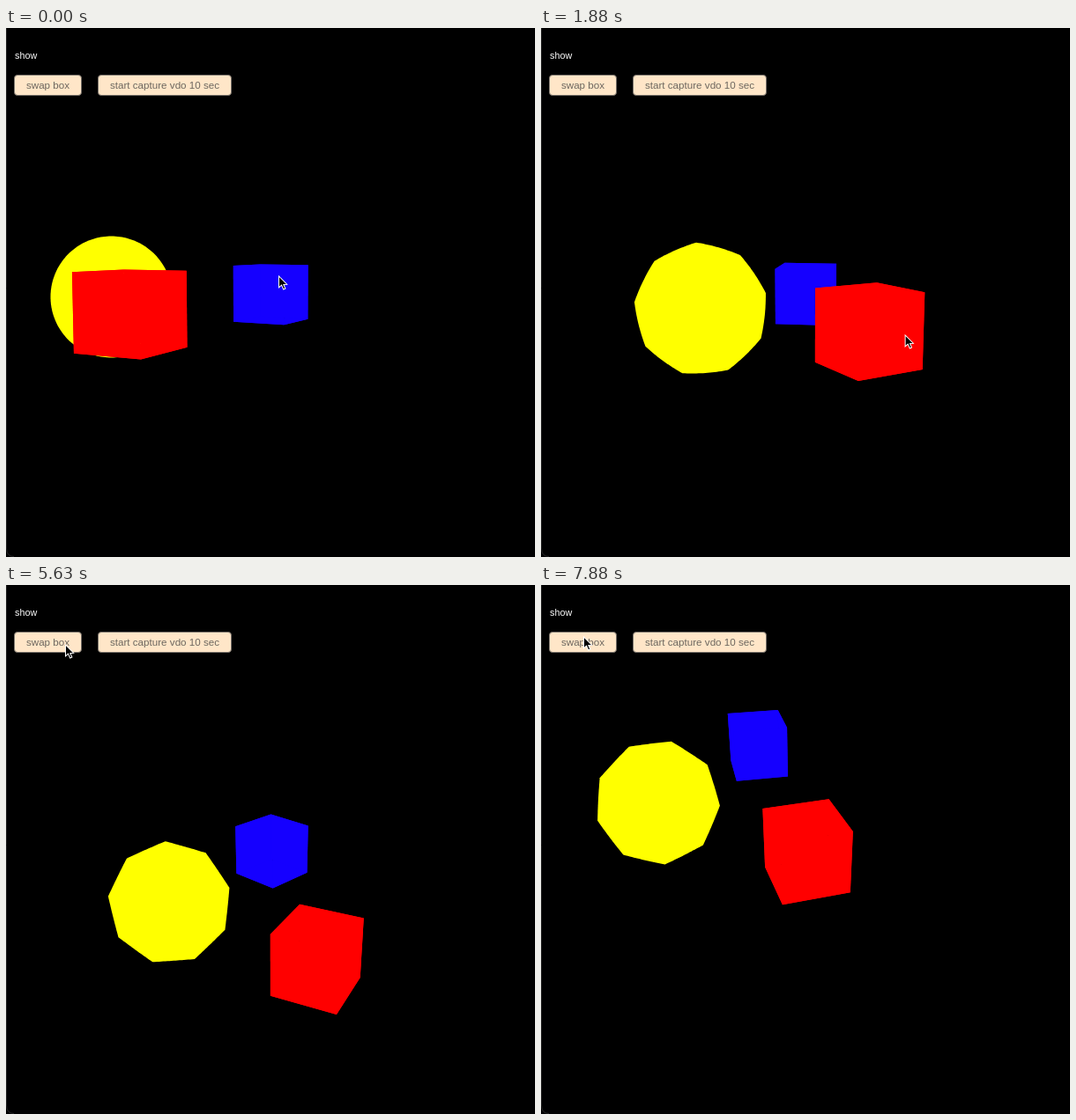
These frames come from a looping animation (600 by 601 pixels, 8 s). An HTML page with a canvas:

```html
<!DOCTYPE html>
<html>
<head>
<meta charset="utf-8">
<style>
html, body { margin: 0; width: 100%; height: 100%; overflow: hidden; background: #000; }
body { position: relative; font-family: "Liberation Sans", Arial, sans-serif; }
canvas, div { position: absolute; }
canvas { left: 0; top: 0; }
.label { left: 10px; top: 25px; font-size: 10.8px; line-height: 13px; color: #fff; }
.button {
  box-sizing: border-box; top: 53px; height: 24px; border: 1px solid #767069; border-radius: 4px;
  background: #ffe6c8; color: #6c675f; font-size: 11.65px; line-height: 22px;
  text-align: center; white-space: nowrap;
}
</style>
</head>
<body>
<div class="label">show</div>
<div class="button" style="left:9px;width:77px">swap box</div>
<div class="button" style="left:104px;width:152px">start capture vdo 10 sec</div>
<canvas width="600" height="601"></canvas>
<script>
const ctx = document.querySelector('canvas').getContext('2d');
const LOOP = 8000, STEP = 125;
const FOCAL = 725, MID_X = 301.5, MID_Y = 301;
const RAD = Math.PI / 180;

// The view is dragged through three poses, then "swap box" toggles the last one
const STOPS = [0, 1.125, 2.25];

// Cube pose: centre x, centre y, size, camera pitch, camera yaw
const blue = {
  color: '#1500ff', spin: t => 24 + (t - 4.5) / RAD,
  poses: [[301, 301, 62.8, 4, -54], [301.5, 301, 68.5, -17, -2], [301.5, 301, 57.5, 22, 0]],
  swapped: [245.7, 181.5, 58, 31.5, 0]
};
const red = {
  color: '#f00', spin: t => -23.2 - (t - 5.625) / RAD,
  poses: [[142.5, 321.5, 90, 4, -37], [407.5, 178.5, 104, -17, -8], [353, 422.5, 79.5, 22, 0]],
  swapped: [301, 301.5, 79.5, 31.5, 0]
};

// Ball pose: centre x, centre y, radius, angle of a corner, roundness
const ball = {
  poses: [[119.5, 305.5, 69, -94, 1], [173, 236, 87.5, -94, 0.9], [185.5, 361, 70, -94, 0.06]],
  swapped: [132, 247, 71, -77, 0.1]
};

const pointer = {
  stops: [0, 1.125, 3, 4.5, 5.5, 7.25, 7.75],
  poses: [[309, 282], [423, 319], [397, 394], [278, 360], [67, 68], [67, 68], [48, 59]]
};

const lerp = (a, b, k) => a + (b - a) * k;
const isSwapped = t => (t >= 6.6 && t < 7.2) || t >= 7.6;

function sample(stops, poses, t) {
  const i = stops.findIndex(stop => stop > t);
  if (i < 0) return poses.at(-1);
  const k = (t - stops[i - 1]) / (stops[i] - stops[i - 1]);
  return poses[i].map((v, n) => lerp(poses[i - 1][n], v, k));
}

const poseOf = (thing, t) => isSwapped(t) ? thing.swapped : sample(STOPS, thing.poses, t);

function fill(points, color) {
  ctx.beginPath();
  points.forEach(p => ctx.lineTo(p[0], p[1]));
  ctx.closePath();
  ctx.fillStyle = color;
  ctx.fill();
}

function drawCube(cube, t) {
  const [cx, cy, size, pitch, turn] = poseOf(cube, t);
  const yaw = (cube.spin(t) + turn) * RAD + Math.atan((cx - MID_X) / FOCAL);
  const c = Math.cos(pitch * RAD), s = Math.sin(pitch * RAD);
  const corner = (i, y) => {
    const a = yaw + i * Math.PI / 2;
    const x = Math.SQRT1_2 * Math.sin(a), away = Math.SQRT1_2 * Math.cos(a);
    const depth = 1 + (away * c - y * s) * size / FOCAL;
    return [MID_X + (cx - MID_X + x * size) / depth,
            MID_Y + (cy - MID_Y - (y * c + away * s) * size) / depth];
  };
  const top = [0, 1, 2, 3].map(i => corner(i, 0.5));
  const base = [0, 1, 2, 3].map(i => corner(i, -0.5));
  fill(top, cube.color);
  fill(base, cube.color);
  for (let i = 0; i < 4; i++) {
    const j = (i + 1) % 4;
    fill([top[i], top[j], base[j], base[i]], cube.color);
  }
}

// A nine-sided outline that can swell into a circle
function drawBall(t) {
  const [cx, cy, radius, corner, roundness] = poseOf(ball, t);
  const points = Array.from({ length: 180 }, (_, i) => {
    const offset = i * 2 % 40 - 20, a = (corner + 20 + i * 2 - 20 + 20 - 20) * RAD;
    const flat = Math.cos(20 * RAD) / Math.cos(offset * RAD);
    const r = radius * lerp(flat, 1, roundness);
    return [cx + r * Math.cos(a), cy + r * Math.sin(a)];
  });
  fill(points, '#ff0');
}

function drawPointer(t) {
  const [x, y] = sample(pointer.stops, pointer.poses, t);
  ctx.save();
  ctx.translate(x + 0.5, y);
  ctx.scale(0.92, 0.92);
  fill([[0, 0], [0, 14], [3.3, 11], [5.7, 16.3], [8, 15.3], [5.8, 10.2], [10, 10]], '#000');
  ctx.strokeStyle = '#fff';
  ctx.lineWidth = 1.1;
  ctx.stroke();
  ctx.restore();
}

function drawEdge() {
  ctx.beginPath();
  ctx.moveTo(0.5, 0);
  ctx.lineTo(0.5, 591);
  ctx.quadraticCurveTo(0.5, 600.5, 9, 600.5);
  ctx.strokeStyle = '#262626';
  ctx.lineWidth = 1;
  ctx.stroke();
}

const start = performance.now();
function frame() {
  const ms = (performance.now() - start) % LOOP;
  const t = Math.floor(ms / STEP) * STEP / 1000;
  ctx.clearRect(0, 0, 600, 601);
  drawEdge();
  drawBall(t);
  drawCube(blue, t);
  drawCube(red, t);
  drawPointer(t);
  requestAnimationFrame(frame);
}
frame();
</script>
</body>
</html>
```
